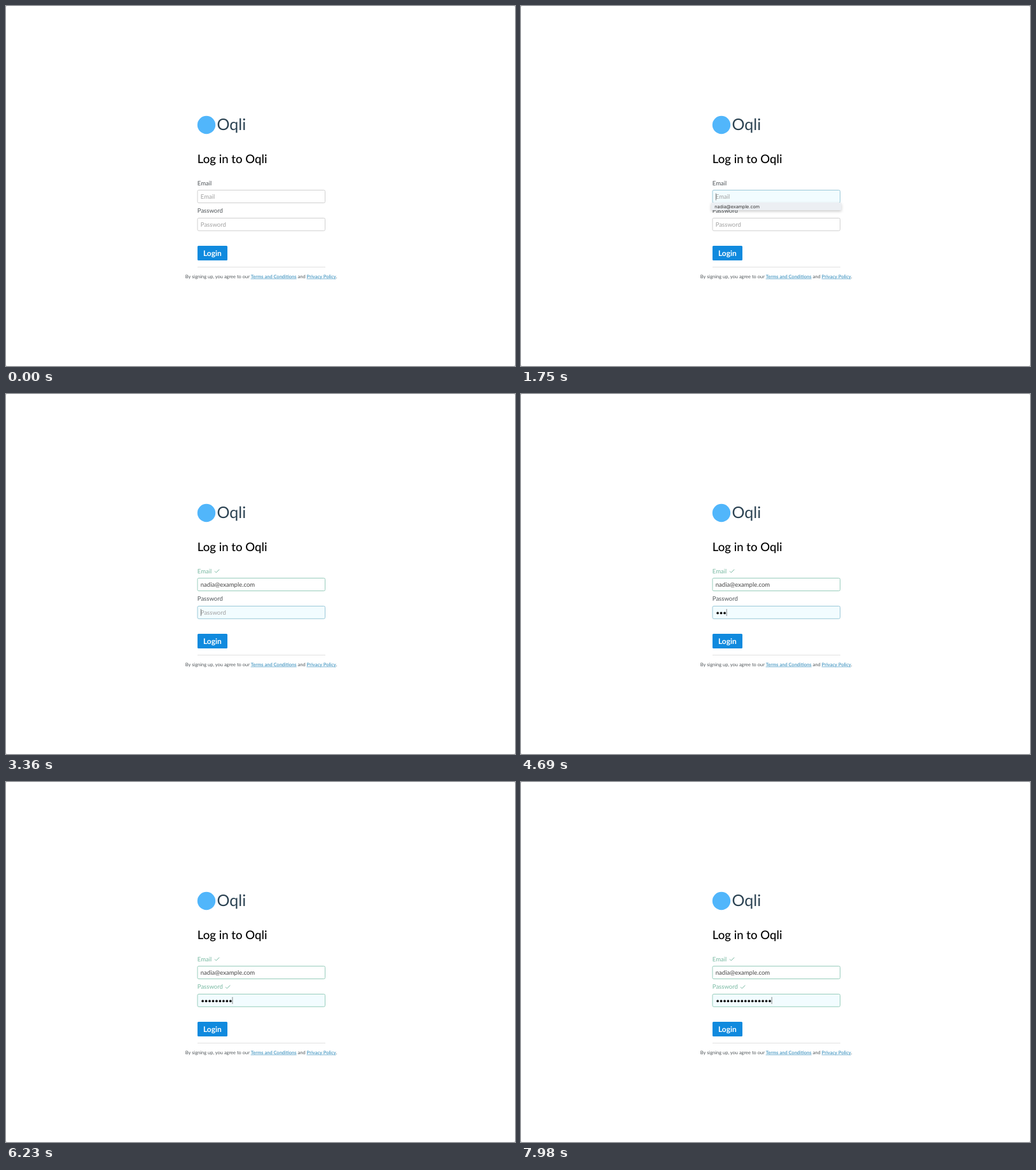
An HTML page that plays this animation: 800x566 px, repeating every 8000 ms.

```html
<!DOCTYPE html>
<html lang="en">
<head>
<meta charset="utf-8">
<title>Log in</title>
<style>
  html, body { margin: 0; width: 100%; height: 100%; overflow: hidden; background: #ccc; }
  svg { display: block; width: 800px; height: 566px; font: 9.55px Lato, sans-serif; text-rendering: geometricPrecision; }
  .label { fill: #50565a; }
  .hint { fill: #a0a0a0; }
  .value { fill: #444; }
  .box { fill: #fff; stroke: #d0d0d0; }
  .focus .box { fill: #f2fcff; stroke: #9ac8d8; }
  .valid .box { stroke: #98cdbc; }
  .valid .label { fill: #78b9a2; }
  .tick { fill: none; stroke: #78b9a2; visibility: hidden; }
  .valid .tick { visibility: visible; }
  .caret { stroke: #555; stroke-width: .7; visibility: hidden; }
  .focus .caret { visibility: visible; }
  .terms { font-size: 7.49px; fill: #50565a; }
  .link { font-weight: 700; fill: #5ba3c9; text-decoration: underline; }
  #menu { filter: drop-shadow(0 2px 2px #0003); }
</style>
</head>
<body>
<svg viewBox="0 0 800 566">
  <rect width="800" height="566" rx="2" fill="#fff"/>

  <circle cx="315" cy="187" r="14.2" fill="#51b6fb"/>
  <text x="331.5" y="195.3" font-size="25" fill="#2b4252">Oqli</text>
  <text x="300.8" y="247" font-size="18.6" font-weight="500" fill="#000">Log in to Oqli</text>

  <g id="email">
    <text class="label" x="300.8" y="281.5">Email</text>
    <path class="tick" d="M328 278.5l2.3 2.3 5-5"/>
    <rect class="box" x="301" y="289.5" width="200.5" height="20" rx="2"/>
    <text class="hint" x="305.8" y="303.4">Email</text>
    <text class="value" x="305.8" y="303.4">nadia@example.com</text>
    <path class="caret" d="M0 294.5v11"/>
  </g>

  <g id="password">
    <text class="label" x="300.8" y="325.3">Password</text>
    <path class="tick" d="M345 322.3l2.3 2.3 5-5"/>
    <rect class="box" x="301" y="333.5" width="200.5" height="19.8" rx="2"/>
    <text class="hint" x="305.8" y="347.2">Password</text>
    <g class="value"></g>
    <path class="caret" d="M0 338v11"/>
  </g>

  <g id="menu">
    <rect x="299" y="309" width="204.5" height="12" rx="1.5" fill="#eceff3"/>
    <text x="304.3" y="317.5" style="font: 7.2px Inter, sans-serif" fill="#333">nadia@example.com</text>
  </g>

  <rect x="301" y="377" width="47" height="23" rx="1.5" fill="#108ade"/>
  <text x="324.4" y="393.4" font-size="12" font-weight="700" fill="#fff" text-anchor="middle">Login</text>

  <path d="M301 410.5h201" stroke="#e2e2e2"/>
  <text class="terms" x="281.8" y="427.6">By signing up, you agree to our <tspan class="link">Terms and Conditions</tspan> and <tspan class="link">Privacy Policy</tspan>.</text>
</svg>

<script>
const LOOP = 8000;
const EMAIL_FOCUS = 1190, EMAIL_PICK = 2450, PASSWORD_FOCUS = 3010;
const TYPE_START = 3900, KEY_TIME = 250, MIN_LENGTH = 8;
const TEXT_X = 306.4, DOT_STEP = 5.46;

const field = id => {
  const root = document.getElementById(id);
  const part = name => root.querySelector('.' + name);
  return { root, hint: part('hint'), value: part('value'), caret: part('caret') };
};
const email = field('email');
const password = field('password');
const menu = document.getElementById('menu');
const show = (el, on) => { el.style.visibility = on ? 'visible' : 'hidden'; };

function update({ root, hint, value, caret }, { focus, valid, filled, caretX }) {
  root.classList.toggle('focus', focus);
  root.classList.toggle('valid', valid);
  show(hint, !filled);
  show(value, filled);
  caret.setAttribute('transform', `translate(${caretX})`);
}

const dots = count => Array.from({ length: count }, (_, i) =>
  `<circle cx="${TEXT_X + (i + 0.5) * DOT_STEP}" cy="344.4" r="1.85" fill="#111"/>`).join('');

function draw(t) {
  const picked = t >= EMAIL_PICK;
  const onPassword = t >= PASSWORD_FOCUS;
  const typed = Math.max(0, Math.floor((t - TYPE_START) / KEY_TIME));

  update(email, {
    focus: t >= EMAIL_FOCUS && !onPassword,
    valid: picked,
    filled: picked,
    caretX: picked ? 306 + email.value.getComputedTextLength() : TEXT_X
  });
  show(menu, t >= EMAIL_FOCUS && !picked);

  password.value.innerHTML = dots(typed);
  update(password, {
    focus: onPassword,
    valid: typed >= MIN_LENGTH,
    filled: typed > 0,
    caretX: TEXT_X + typed * DOT_STEP + (typed ? 0.4 : 0)
  });
}

const start = performance.now();
function frame() {
  draw((performance.now() - start) % LOOP);
  requestAnimationFrame(frame);
}
frame();
</script>
</body>
</html>
```
